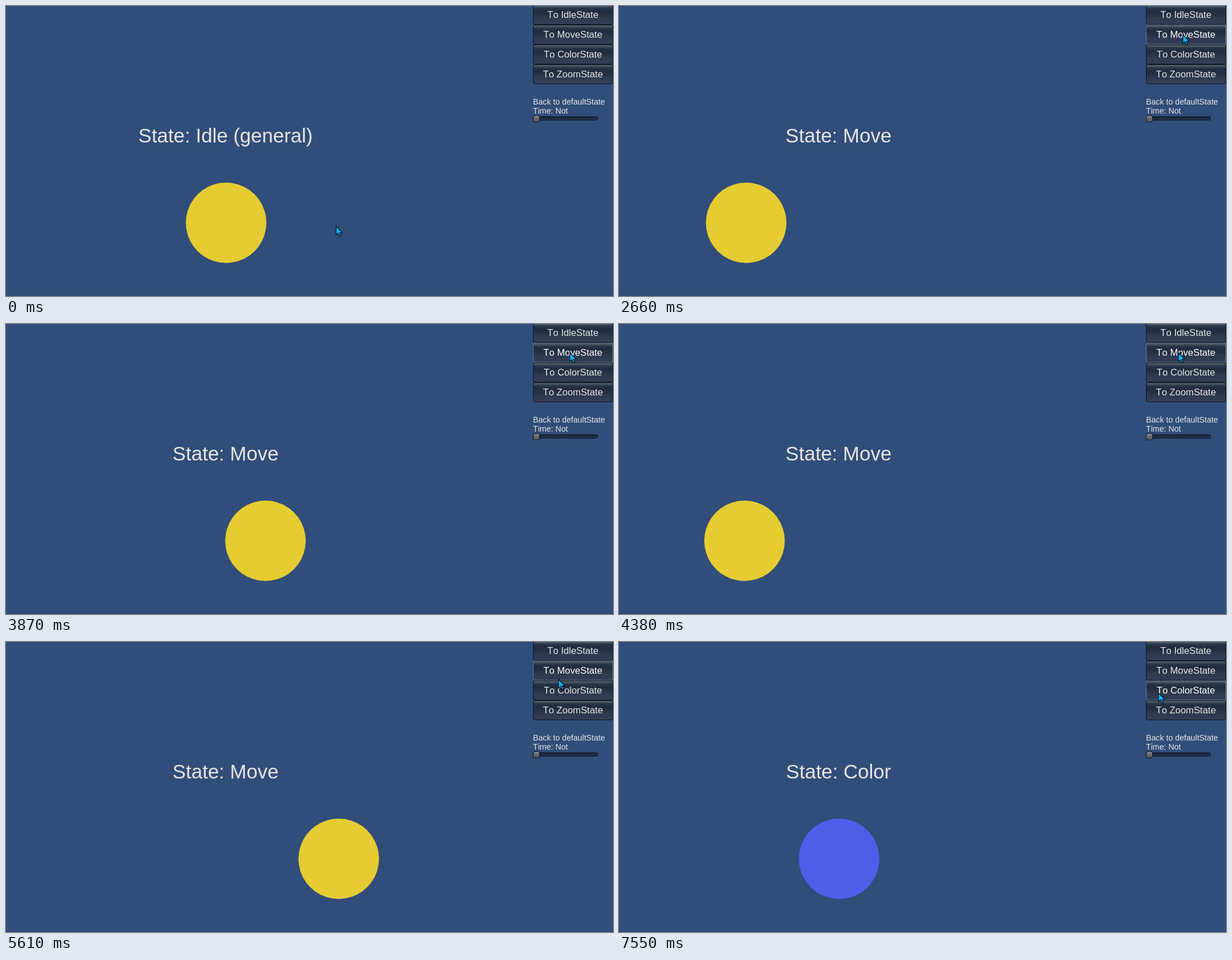
Write an HTML page with a canvas that moves like this. It is 1070 by 512 pixels and loops after 8000 ms.

```html
<!DOCTYPE html>
<html lang="en">
<head>
<meta charset="utf-8">
<title>State demo</title>
<style>
html, body { margin: 0; width: 100%; height: 100%; overflow: hidden; background: #314d79; }
canvas { display: block; width: 1070px; height: 512px; }
</style>
</head>
<body>
<canvas id="stage" width="1070" height="512"></canvas>
<script>
const ctx = document.getElementById('stage').getContext('2d');
const LOOP = 8000;
const STEP = 136.6; // ms between screen refreshes
const FONT = '"Liberation Sans", Arial, sans-serif';
const LABELS = ['To IdleState', 'To MoveState', 'To ColorState', 'To ZoomState'];

// Steps at which the demo changes
const MOVE = 19, COLOR = 51, RECOLOR = 55;

// The ball bounces between LEFT and RIGHT, turning at these steps
const LEFT = 174, RIGHT = 602;
const TURNS = [18.13, 25.55, 32.8, 40.75, 47.65, 54.9];

// Pointer stops: [step, x, y]
const POINTER = [[1, 582, 389], [9, 985, 46], [11, 994, 25], [14, 994, 51],
  [28, 994, 51], [35, 980, 51], [37, 980, 51], [41, 974, 66], [46, 951, 90]];

const mix = (a, b, p) => a + (b - a) * p;

function ballX(k) {
  const i = TURNS.findIndex(t => t > k) - 1;
  const p = (k - TURNS[i]) / (TURNS[i + 1] - TURNS[i]);
  return mix(LEFT, RIGHT, i % 2 ? 1 - p : p);
}

function pointerAt(k) {
  const i = POINTER.findIndex(stop => stop[0] > k);
  if (i < 0) return POINTER[POINTER.length - 1].slice(1);
  if (i === 0) return POINTER[0].slice(1);
  const a = POINTER[i - 1], b = POINTER[i];
  const p = (k - a[0]) / (b[0] - a[0]);
  return [mix(a[1], b[1], p), mix(a[2], b[2], p)];
}

function text(str, x, y, size, color, align = 'left') {
  ctx.font = size + 'px ' + FONT;
  ctx.fontKerning = 'none';
  ctx.textAlign = align;
  ctx.fillStyle = color;
  ctx.fillText(str, x, y);
}

function box(x, y, w, h, r, fill) {
  ctx.beginPath();
  ctx.roundRect(x, y, w, h, r);
  ctx.fillStyle = fill;
  ctx.fill();
}

function shade(y, h, ...stops) {
  const g = ctx.createLinearGradient(0, y, 0, y + h);
  stops.forEach(([at, color]) => g.addColorStop(at, color));
  return g;
}

function button(i, hover, pressed) {
  const y = i * 35 - 2;
  const fill = pressed
    ? shade(y, 34, [0, '#141c2b'], [0.5, '#1b2537'], [1, '#27334a'])
    : shade(y, 34, [0, '#566370'], [0.1, '#46535f'], [0.17, '#2a3749'],
        [0.3, '#212c3f'], [0.5, '#253044'], [0.65, '#2e394e'], [1, '#343f56']);
  box(929, y, 141, 35, 4, hover ? '#5f7089' : '#0c1422');
  box(930, y + 1, 139, 33, 3, fill);
  text(LABELS[i], 999.3, 21 + i * 35, 16.7, hover ? '#ffffff' : '#e6e6e6', 'center');
}

function slider() {
  text('Back to defaultState', 929, 174, 14.2, '#e6e6e6');
  text('Time: Not', 929, 190, 14.2, '#e6e6e6');
  box(929, 195, 114, 7, 3, '#0b1220');
  box(930, 196, 112, 5, 2, shade(196, 5, [0, '#18233a'], [1, '#263654']));
  box(929, 193, 12, 12, 3.5, '#10151d');
  box(930, 194, 10, 10, 2.5, shade(194, 10, [0, '#8f9499'], [0.4, '#666b71'], [1, '#54595f']));
}

function ball(x, color) {
  const sides = 40;
  ctx.beginPath();
  for (let i = 0; i < sides; i++) {
    const a = i / sides * Math.PI * 2;
    ctx.lineTo(x + 71 * Math.cos(a), 382.7 + 71 * Math.sin(a));
  }
  ctx.fillStyle = color;
  ctx.fill();
}

function pointer(x, y) {
  ctx.save();
  ctx.translate(x, y);
  ctx.beginPath();
  [[0, 0], [0, 15.5], [3.6, 12.2], [6, 17.6], [8.6, 16.5], [6.2, 11.3], [11, 11]]
    .forEach(p => ctx.lineTo(...p));
  ctx.closePath();
  ctx.fillStyle = '#12b4ff';
  ctx.fill();
  ctx.strokeStyle = '#05101c';
  ctx.lineWidth = 1.2;
  ctx.stroke();
  ctx.restore();
}

function draw(ms) {
  const k = Math.floor(ms / STEP);
  const moving = k >= MOVE && k < COLOR;
  const name = k < MOVE ? 'Idle (general)' : moving ? 'Move' : 'Color';
  const held = k === MOVE - 1 || k === COLOR - 1;
  const [px, py] = pointerAt(k);

  ctx.fillStyle = '#314d79';
  ctx.fillRect(0, 0, 1070, 512);
  ctx.fillStyle = '#2c466e';
  ctx.fillRect(0, 511, 1070, 1);

  text('State: ' + name, 387, 241, 35, '#e6e6e6', 'center');
  ball(moving ? ballX(k) : 388, k < RECOLOR ? '#e5cc33' : '#505de9');
  LABELS.forEach((_, i) => {
    const hover = px >= 929 && Math.floor((py + 2) / 35) === i;
    button(i, hover, hover && held);
  });
  slider();
  pointer(px, py);
}

function loop(now) {
  draw(now % LOOP);
  requestAnimationFrame(loop);
}
draw(0);
requestAnimationFrame(loop);
</script>
</body>
</html>
```
